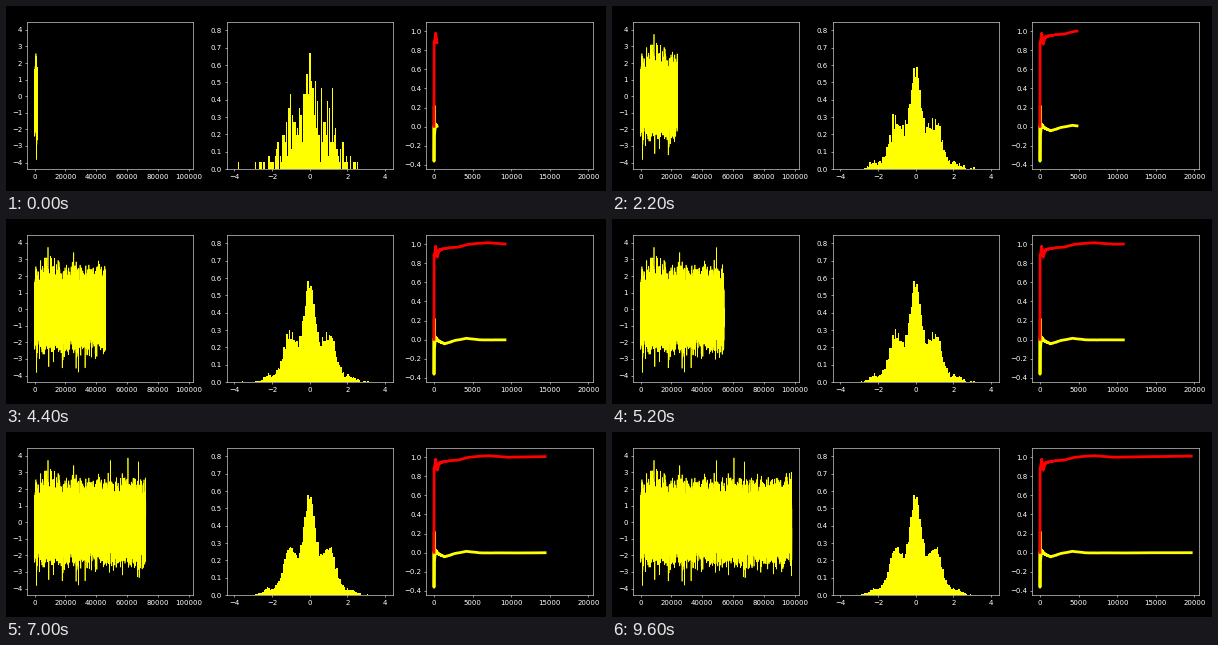
Animation of 600x185 px, one loop 9800 ms. Source, as a matplotlib script:

```python
import numpy as np
import matplotlib.pyplot as plt
from matplotlib.animation import FuncAnimation

W, H, DPI = 600, 185, 50
FRAMES, STEP, THIN, BINS = 49, 400, 5, 100
TOTAL = FRAMES * STEP

plt.style.use("dark_background")
rng = np.random.default_rng(7)
steps = np.arange(TOTAL)


def normal(x, mu, sd):
    return np.exp(-0.5 * ((x - mu) / sd) ** 2) / (sd * np.sqrt(2 * np.pi))


def density(x):
    p = 0.49 * normal(x, 0, 1) + 0.255 * normal(x, 0, 0.27)
    for side in (-1, 1):
        p += 0.1175 * normal(x, 1.1 * side, 0.28) + 0.01 * normal(x, 2.25 * side, 0.2)
    return p


def make_samples():
    """Blocks of jittered ranks mapped through the inverse distribution function."""
    grid = np.linspace(-4, 4.06, 2001)
    cdf = np.cumsum(density(grid))
    cdf = (cdf - cdf[0]) / (cdf[-1] - cdf[0])
    blocks = []
    for _ in range(FRAMES):
        u = (np.arange(STEP) + rng.normal(0, 6, STEP)) / STEP
        u = 1 - np.abs(1 - np.abs(u))
        blocks.append(rng.permutation(np.interp(u, cdf, grid)))
    return np.concatenate(blocks)


def running_stat(x, y):
    """Trend through key points plus a wobble that fades like a running mean."""
    wobble = 0.15 * np.cumsum(rng.normal(size=TOTAL)) / (steps + 60)
    return np.interp(steps, x, y) + wobble


samples = make_samples()
mean = running_stat([0, 8, 45, 90, 200, 500, 1400, 2500, 4200, 6000],
                    [0, -0.375, 0.2, -0.07, 0.03, -0.01, -0.038, -0.01, 0.017, 0])
variance = running_stat([0, 20, 220, 430, 650, 1600, 3100, 4500, 7000, 9500, 19600],
                        [0, 0.87, 0.985, 0.86, 0.94, 0.957, 0.97, 1, 1.017, 1, 1.01])

fig = plt.figure(figsize=(W / DPI, H / DPI), dpi=DPI)
axes = fig.subplots(1, 3, gridspec_kw=dict(left=21 / W, right=586.8 / W, wspace=0.2,
                                           bottom=21.8 / H, top=168.8 / H))
trace_ax, hist_ax, stat_ax = axes

trace, = trace_ax.plot([], [], color="yellow", lw=1)
bars = hist_ax.bar(np.zeros(BINS), np.zeros(BINS), color="yellow", align="edge")
mean_line, = stat_ax.plot([], [], color="yellow", lw=4)
var_line, = stat_ax.plot([], [], color="red", lw=4)

trace_ax.set(xticks=range(0, 100001, 20000), yticks=range(-4, 5),
             xlim=(-4900, 102900), ylim=(-4.4, 4.46))
hist_ax.set(xticks=range(-4, 5, 2), yticks=np.arange(9) / 10,
            xlim=(-4.4, 4.42), ylim=(0, 0.847))
stat_ax.set(xticks=range(0, 20001, 5000), yticks=np.arange(-2, 6) / 5,
            xlim=(-980, 20580), ylim=(-0.445, 1.094))


def update(frame):
    n = (frame + 1) * STEP
    trace.set_data(steps[:n] * THIN, samples[:n])
    heights, edges = np.histogram(samples[:n], BINS, density=True)
    for bar, x, w, h in zip(bars, edges, np.diff(edges), heights):
        bar.set_bounds(x, 0, w, h)
    mean_line.set_data(steps[:n], mean[:n])
    var_line.set_data(steps[:n], variance[:n])
    return [trace, mean_line, var_line, *bars]


anim = FuncAnimation(fig, update, frames=FRAMES, interval=200, repeat=True, repeat_delay=0)
plt.show()
```
